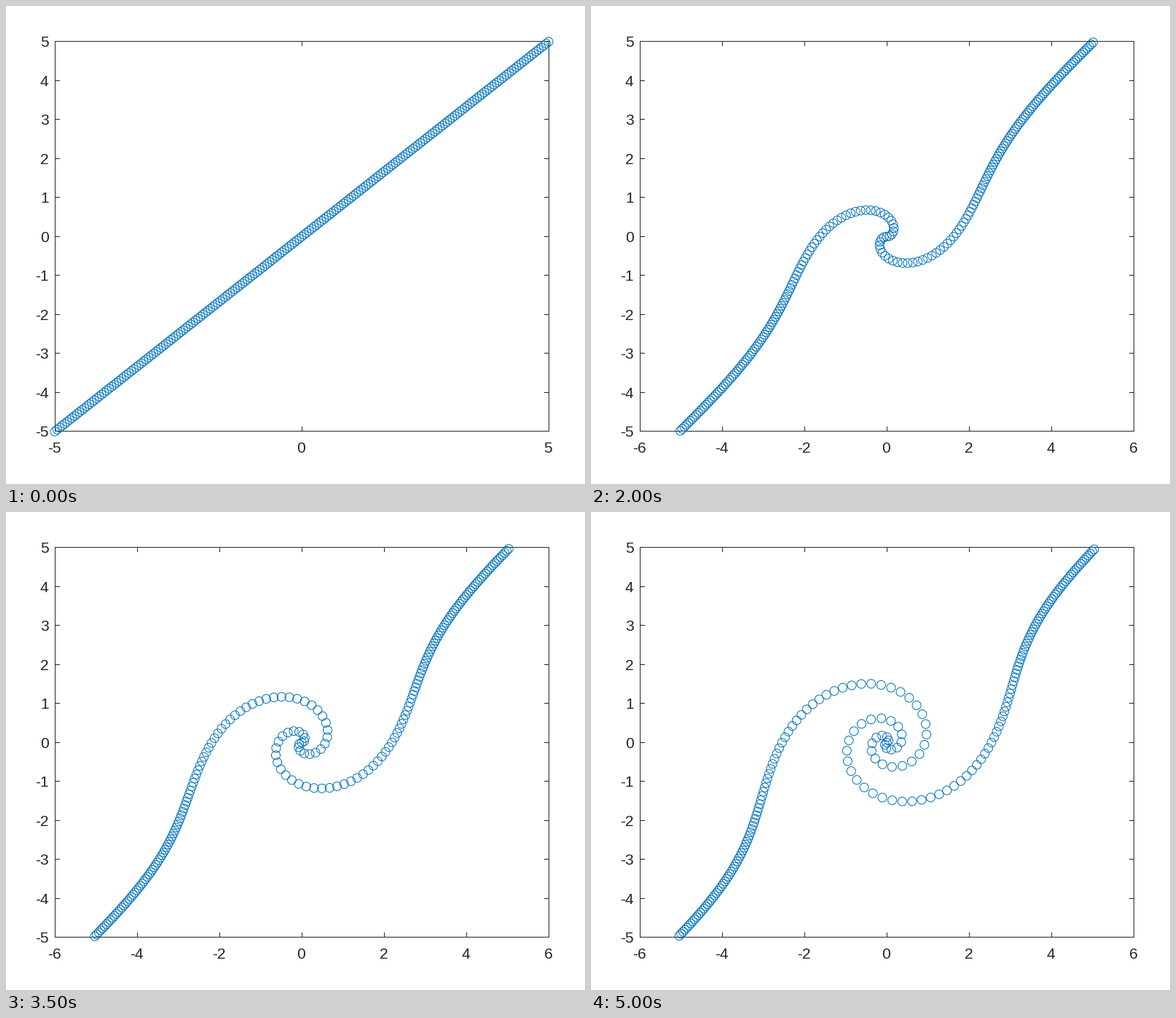
A matplotlib script for the animation above (5500 ms loop, 795 by 656 pixels).

```python
import numpy as np
import matplotlib.pyplot as plt
from matplotlib.animation import FuncAnimation

W, H, DPI = 795, 656, 128
PT = 72 / DPI                                  # points per pixel
LEFT, RIGHT, TOP, BOTTOM = 67, 745, 49, 584    # plot box in pixels
CX, CY = (LEFT + RIGHT) / 2, (TOP + BOTTOM) / 2
Y_UNIT = (BOTTOM - TOP) / 10
INK, BLUE = "#262626", "#0072BD"
TICK = 7
STEPS = 11

plt.rcParams["font.family"] = "Liberation Sans"
fig = plt.figure(figsize=(W / DPI, H / DPI), dpi=DPI, facecolor="white")
ax = fig.add_axes([0, 0, 1, 1])
ax.set(xlim=(0, W), ylim=(H, 0))
ax.axis("off")


def line(xs, ys):
    # Coordinates are pixel centres already, so snapping would shift them
    return ax.plot(xs, ys, color=INK, lw=PT, solid_capstyle="butt",
                   snap=False, zorder=1)[0]


def label(x, y, value, ha):
    return ax.text(x, y, str(value), color=INK, fontsize=21 * PT,
                   ha=ha, va="baseline")


def x_axis(limit, step):
    """Ticks and labels of an x axis running from -limit to limit."""
    parts = []
    for v in range(-limit, limit + 1, step):
        x = CX + v * (RIGHT - LEFT) / (2 * limit)
        parts.append(label(x - 0.6, 612.8, v, "center"))
        if abs(v) < limit:
            col = x + 0.5
            parts.append(line([col, col], [TOP, TOP + TICK - 1]))
            parts.append(line([col, col], [BOTTOM - TICK, BOTTOM - 1]))
    return parts


# Box
l, r, t, b = LEFT + 0.5, RIGHT + 0.5, TOP - 0.5, BOTTOM - 0.5
for y in (t, b):
    line([LEFT, RIGHT + 1], [y, y])
for x in (l, r):
    line([x, x], [TOP - 1, BOTTOM])

# Fixed y axis
for v in range(-5, 6):
    y = CY - v * Y_UNIT
    label(58.6, y + 7.4, v, "right")
    if abs(v) < 5:
        row = np.ceil(y) - 0.5
        line([LEFT + 1, LEFT + TICK], [row, row])
        line([RIGHT - TICK + 1, RIGHT], [row, row])

narrow, wide = x_axis(5, 5), x_axis(6, 2)

# Points on the diagonal, each turning clockwise at the rate exp(-radius)
start = np.linspace(-5, 5, 201)
rate = np.exp(-np.hypot(start, start))
dots = ax.scatter(start, start, s=(12 * PT) ** 2, facecolors="none",
                  edgecolors=BLUE, linewidths=PT, zorder=3, clip_on=False)


def draw(i):
    angle = i * rate
    c, s = np.cos(angle), np.sin(angle)
    x, y = start * (c + s), start * (c - s)
    limit = 5 if i == 0 else 6
    x_unit = (RIGHT - LEFT) / (2 * limit)
    dots.set_offsets(np.column_stack([CX + x * x_unit, CY - y * Y_UNIT]))
    for part in narrow:
        part.set_visible(i == 0)
    for part in wide:
        part.set_visible(i > 0)
    return [dots, *narrow, *wide]


anim = FuncAnimation(fig, draw, frames=STEPS, interval=500,
                     repeat=True, repeat_delay=0, blit=False)
plt.show()
```
